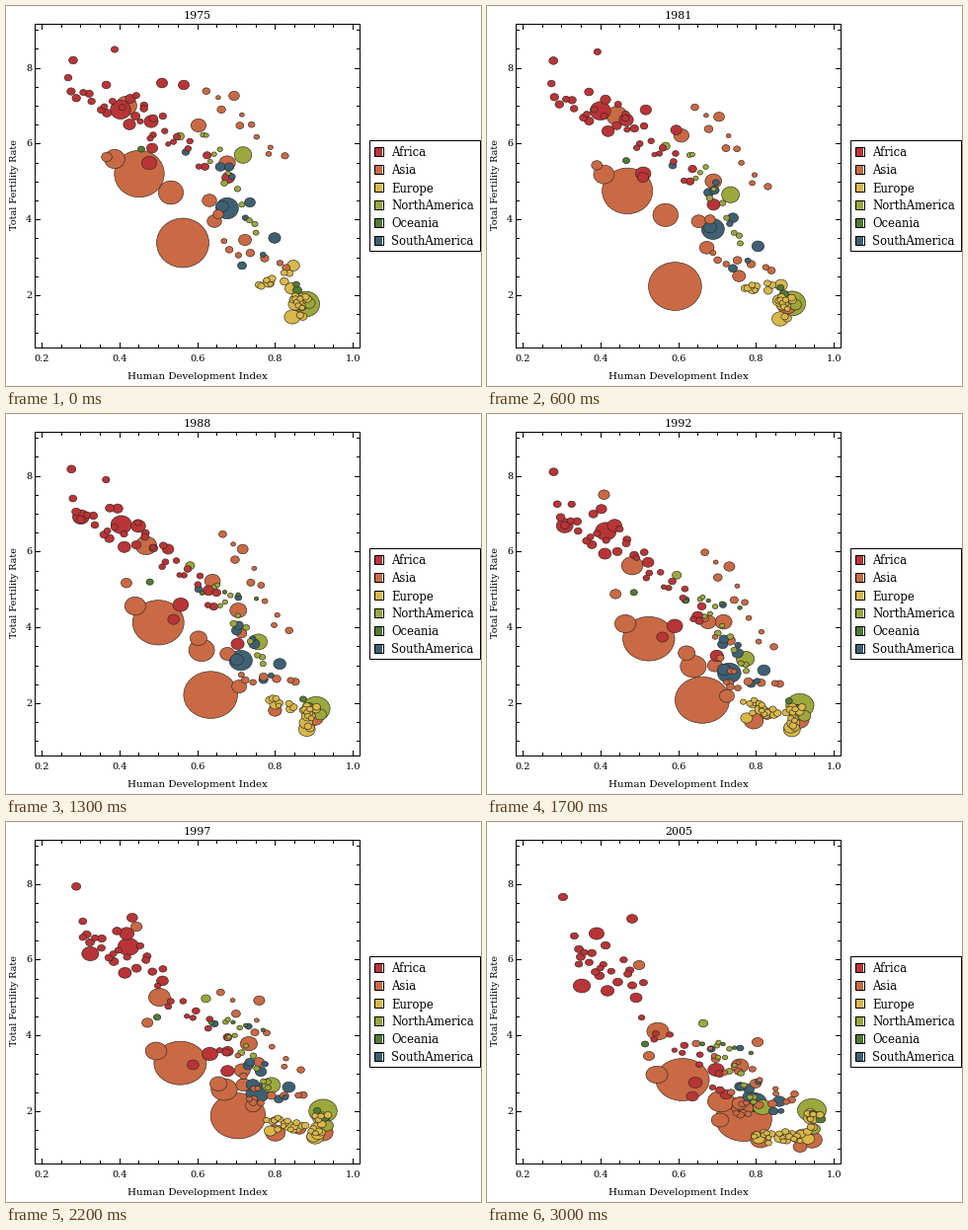
These frames come from a looping animation (481x385 px, 3100 ms). A matplotlib script:

```python
import random

import numpy as np
import matplotlib.pyplot as plt
from matplotlib.animation import FuncAnimation
from matplotlib.patches import Ellipse, Rectangle

W, H, DPI = 481, 385, 64
YEARS = 31
COLORS = {
    "Africa": "#b93436", "Asia": "#c96a44", "Europe": "#d8b84b",
    "NorthAmerica": "#9ca83c", "Oceania": "#4f7c33", "SouthAmerica": "#3d6173",
}
LEFT, RIGHT, TOP, BOTTOM = 29, 358, 18, 346

plt.rcParams["font.family"] = "DejaVu Serif"
fig = plt.figure(figsize=(W / DPI, H / DPI), dpi=DPI, facecolor="white")
ax = fig.add_axes([0, 0, 1, 1])
ax.set_xlim(0, W)
ax.set_ylim(H, 0)
ax.axis("off")

rng = random.Random(12)
bubbles = []


def pt(px):
    return px * 72 / DPI


def label(x, y, text, size, **kw):
    kw = {"ha": "center", "va": "center", **kw}
    return ax.text(x, y, text, fontsize=pt(size), **kw)


def line(xs, ys):
    ax.plot(xs, ys, color="black", lw=pt(1), zorder=1)


def box(x, y, w, h, **kw):
    ax.add_patch(Rectangle((x, y), w, h, lw=pt(1), ec="black", **kw))


def bubble(kind, r, *path, first=0, last=YEARS):
    """Add a bubble whose path corners are evenly spaced over the loop."""
    shape = Ellipse((0, 0), 1, 1, fc=COLORS[kind], ec="#2b2420",
                    lw=pt(0.6), zorder=100 - r)
    ax.add_patch(shape)
    bubbles.append((shape, r, np.array(path, float), first, last))


def crowd(kind, count, sizes, spread, *lines, first=0):
    """Scatter small bubbles along a line that moves through the given lines."""
    for i in range(count):
        u = (i + 0.5) / count
        shift = np.array([rng.uniform(-spread, spread) for _ in "xy"])
        path = [np.array(a) * (1 - u) + np.array(b) * u + shift for a, b in lines]
        bubble(kind, rng.uniform(*sizes), *path, first=first)


def add_africa():
    bubble("Africa", 10.5, (116, 105), (114, 107), (123, 124), (128, 136), last=27)
    bubble("Africa", 7.3, (147, 117), (132, 113), (111, 113))
    bubble("Africa", 8.4, (75, 100), (76, 105), (96, 166), first=8)
    bubble("Africa", 7.9, (145, 159), (167, 177), (200, 231), (232, 251))
    bubble("Africa", 6.6, (225, 174), (236, 242), (211, 264))
    bubble("Africa", 6.4, (125, 120), (119, 137), (122, 171))
    bubble("Africa", 5.8, (158, 78), (165, 146), (151, 178))
    bubble("Africa", 5.7, (180, 80), (209, 194), (242, 276))
    bubble("Africa", 5.8, (148, 144), (173, 218), (208, 278))
    bubble("Africa", 4.5, (68, 55), (66, 56), (77, 76))
    bubble("Africa", 5.3, (126, 94), (111, 96), (147, 98))
    bubble("Africa", 3.7, (110, 44), (113, 48), (74, 110), (93, 144))
    crowd("Africa", 18, (3.4, 4.8), 12, [(64, 82), (155, 110)],
          [(70, 96), (155, 136)], [(92, 124), (152, 162)])
    crowd("Africa", 12, (2.5, 4.4), 9, [(140, 120), (210, 160)],
          [(155, 140), (220, 198)], [(160, 200), (245, 270)])


def add_asia():
    bubble("Asia", 27.3, (179, 240), (188, 284), (200, 284), (212, 285),
           (227, 297), (247, 299), (260, 301))
    bubble("Asia", 26, (135, 170), (147, 199), (171, 240), (198, 261))
    bubble("Asia", 13, (167, 189), (190, 227), (217, 268), (237, 283))
    bubble("Asia", 10.7, (122, 101), (138, 118), (151, 169), (173, 212))
    bubble("Asia", 10.6, (110, 155), (124, 181), (147, 226), (172, 256))
    bubble("Asia", 10, (297, 300), (314, 308), (329, 322))
    bubble("Asia", 9.7, (270, 305), (269, 309), (277, 322), first=15)
    bubble("Asia", 8.5, (181, 190), (197, 233), (236, 302), first=8)
    bubble("Asia", 8.5, (224, 159), (237, 205), (256, 247))
    bubble("Asia", 7.9, (195, 121), (198, 138), (235, 242), (256, 290))
    bubble("Asia", 7.5, (211, 218), (240, 285), (262, 290))
    bubble("Asia", 7.5, (206, 197), (227, 250), (256, 285))
    bubble("Asia", 6.7, (242, 237), (264, 298), (292, 306), (317, 329))
    bubble("Asia", 5.6, (110, 66), (113, 72), (154, 145), first=15)
    bubble("Asia", 5.5, (102, 153), (125, 174), (164, 237))
    bubble("Asia", 5.5, (231, 91), (241, 144), (274, 223))
    bubble("Asia", 5.4, (215, 211), (242, 224), (272, 265))
    crowd("Asia", 10, (2.4, 4.4), 7, [(206, 86), (280, 155)],
          [(226, 125), (284, 235)], [(214, 225), (310, 278)])
    crowd("Asia", 7, (2.5, 4.5), 6, [(213, 240), (288, 262)],
          [(234, 272), (298, 267)], [(245, 300), (312, 275)])
    crowd("Asia", 6, (2.8, 4), 12, [(215, 265), (250, 290)],
          [(215, 200), (250, 280)], [(225, 235), (266, 305)], first=15)


def add_europe():
    bubble("Europe", 8.4, (290, 315), (307, 320), (320, 318))
    bubble("Europe", 7.3, (293, 302), (310, 302), (328, 300))
    bubble("Europe", 7.3, (299, 297), (311, 301), (331, 299))
    bubble("Europe", 6.8, (289, 286), (306, 317), (318, 320))
    bubble("Europe", 6.5, (291, 263), (308, 312), (325, 321))
    bubble("Europe", 6, (266, 280), (274, 296), (297, 320))
    bubble("Europe", 6, (260, 300), (261, 306), (275, 321), first=15)
    crowd("Europe", 8, (2.5, 4.6), 6, [(254, 284), (290, 274)],
          [(268, 287), (294, 306)], [(268, 316), (312, 320)])
    crowd("Europe", 8, (2.6, 4), 6, [(255, 290), (285, 290)],
          [(258, 290), (285, 300)], [(270, 322), (312, 318)], first=15)
    crowd("Europe", 8, (2.6, 4.6), 8, [(294, 290), (303, 310)],
          [(308, 292), (311, 314)], [(329, 294), (332, 304)])
    crowd("Europe", 7, (2.6, 4.6), 6, [(292, 302), (306, 302)],
          [(304, 305), (316, 305)], [(304, 320), (326, 319)])


def add_americas():
    bubble("NorthAmerica", 14, (304, 302), (312, 301), (319, 293), (329, 292))
    bubble("NorthAmerica", 9.1, (240, 151), (251, 218), (266, 261), (279, 289))
    bubble("NorthAmerica", 6.3, (307, 301), (320, 305), (331, 311))
    bubble("NorthAmerica", 4.6, (176, 132), (188, 157), (219, 204))
    crowd("NorthAmerica", 12, (2.4, 3.7), 9, [(190, 120), (258, 236)],
          [(204, 172), (266, 262)], [(224, 218), (274, 288)])
    bubble("SouthAmerica", 11.7, (224, 205), (232, 240), (251, 272), (271, 284))
    bubble("SouthAmerica", 6.6, (219, 203), (236, 256), (266, 278))
    bubble("SouthAmerica", 6.3, (272, 235), (278, 256), (296, 283))
    bubble("SouthAmerica", 5.6, (247, 199), (252, 238), (265, 270))
    bubble("SouthAmerica", 5.1, (217, 163), (236, 228), (256, 268))
    bubble("SouthAmerica", 4.8, (226, 163), (237, 222), (258, 268))
    bubble("SouthAmerica", 4.6, (239, 263), (264, 270), (290, 293))
    bubble("SouthAmerica", 3.9, (182, 148), (197, 182), (227, 230))
    crowd("SouthAmerica", 3, (2.6, 3.6), 3, [(220, 155), (265, 270)],
          [(227, 170), (275, 285)], [(245, 215), (305, 307)])


def add_oceania():
    bubble("Oceania", 4.7, (295, 288), (309, 298), (338, 301))
    bubble("Oceania", 3.6, (137, 145), (147, 174), (160, 225))
    bubble("Oceania", 3.5, (294, 282), (302, 290), (330, 295))
    crowd("Oceania", 4, (2.2, 2.6), 4, [(188, 160), (262, 168)],
          [(190, 182), (268, 194)], [(210, 222), (280, 238)], first=7)


def add_axes():
    box(LEFT, TOP, RIGHT - LEFT, BOTTOM - TOP, fill=False)
    for i in range(17):
        x = round(36 + i * 19.69)
        size = 3 if i % 4 else 5
        line([x, x], [BOTTOM, BOTTOM - size])
        line([x, x], [TOP, TOP + size])
        if i % 4 == 0:
            label(x + 0.5, 357, f"{0.2 + i * 0.05:.1f}", 9.8)
    for i in range(-2, 15):
        y = round(293 - i * 19.2)
        size = 3 if i % 4 else 5
        line([LEFT, LEFT + size], [y, y])
        line([RIGHT, RIGHT - size], [y, y])
        if i % 4 == 0:
            label(26.5, y + 0.5, str(2 + i // 2), 9.8, ha="right")
    label(194, 376, "Human Development Index", 10.2)
    label(8.5, 181, "Total Fertility Rate", 9.6, rotation=90)


def add_legend():
    box(368, 136, 112, 112, fc="white")
    for i, (name, color) in enumerate(COLORS.items()):
        y = 147 + i * 18
        box(373, y - 4, 9, 9, fc="white", zorder=2)
        ax.add_patch(Rectangle((374, y - 3), 7, 8, fc=color, lw=0, zorder=3))
        label(390.3, y + 0.5, name, 11.6, ha="left", va="center_baseline")


for part in (add_axes, add_legend, add_africa, add_asia, add_europe,
             add_americas, add_oceania):
    part()
title = label(194, 10, "1975", 11)


def update(year):
    t = year / (YEARS - 1)
    title.set_text(str(1975 + year))
    for shape, r, path, first, last in bubbles:
        corners = np.linspace(0, YEARS - 1, len(path))
        shape.set_visible(first <= year < last)
        shape.set_center([np.interp(year, corners, v) for v in path.T])
        shape.width = 2 * r * (0.97 + 0.07 * t)
        aspect = 1.06 + 0.2 * t
        shape.height = shape.width / (aspect if r > 9 else max(aspect, 1.15))
    return [title] + [b[0] for b in bubbles]


anim = FuncAnimation(fig, update, frames=YEARS, interval=100, repeat=True,
                     repeat_delay=0, blit=False)
plt.show()
```
